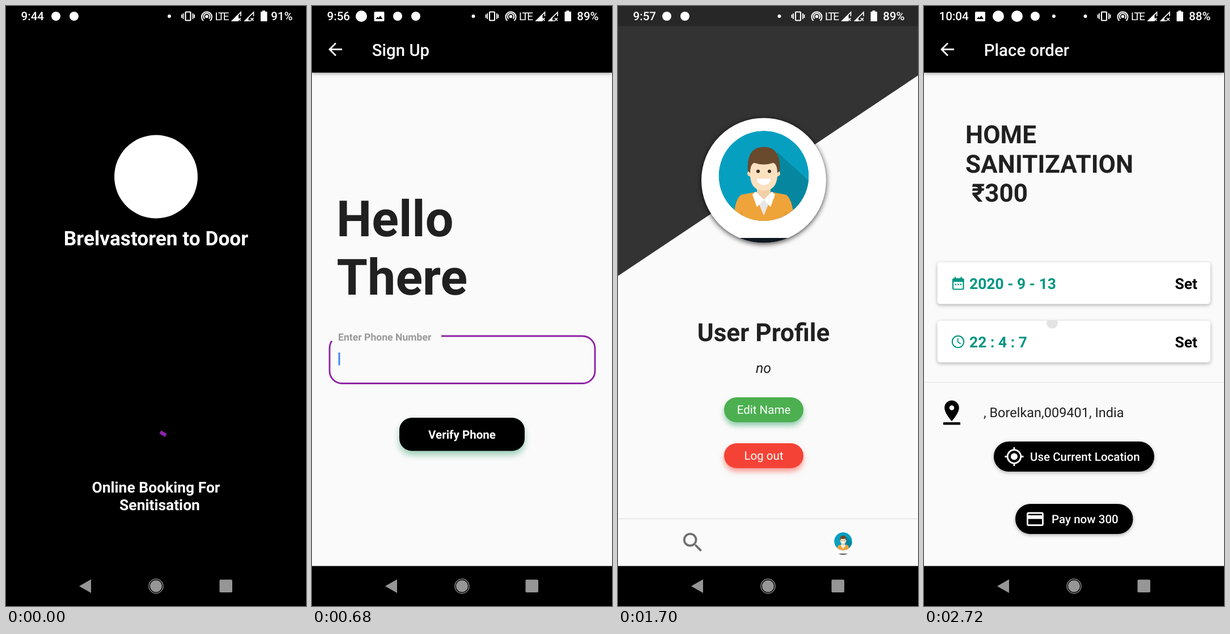
Write an HTML page that moves like this. It is 529 px wide and 1058 px high and loops after 3.06 s.

```html
<!DOCTYPE html>
<html lang="en">
<head>
<meta charset="utf-8">
<title>Booking app walkthrough</title>
<style>
  html, body { margin: 0; width: 100%; height: 100%; overflow: hidden; background: #000; }
  svg { display: block; width: 529px; height: 1058px; font-family: Roboto, sans-serif; }
  text { white-space: pre; text-rendering: geometricPrecision; font-kerning: normal; }
  .lift { filter: drop-shadow(0 2px 3px rgba(0,0,0,.3)); }
</style>
</head>
<body>
<svg id="stage" viewBox="0 0 529 1058">
  <defs>
    <clipPath id="photoClip"><rect width="264.5" height="264.5" rx="29"/></clipPath>
    <clipPath id="faceClip"><circle cy="-8" r="79.5"/></clipPath>
    <clipPath id="avatarClip"><circle r="110"/></clipPath>
    <clipPath id="bodyClip"><rect y="35" width="529" height="870"/></clipPath>
    <clipPath id="cardClip"><rect x="23" y="554.5" width="482" height="74"/></clipPath>
    <linearGradient id="daySky" x2="0" y2="1">
      <stop stop-color="#219fe8"/><stop offset=".6" stop-color="#72c3f1"/><stop offset="1" stop-color="#bfe4f4"/>
    </linearGradient>
    <linearGradient id="water" x2="0" y2="1">
      <stop stop-color="#72b0b4"/><stop offset=".4" stop-color="#469b98"/><stop offset="1" stop-color="#358a82"/>
    </linearGradient>
    <linearGradient id="duskSky" x2="0" y2="1">
      <stop stop-color="#3d8cc4"/><stop offset=".45" stop-color="#86a8c2"/>
      <stop offset=".75" stop-color="#8d8296"/><stop offset="1" stop-color="#dd7d58"/>
    </linearGradient>
    <linearGradient id="city" x2="0" y2="1">
      <stop stop-color="#5c4543"/><stop offset=".4" stop-color="#352b2b"/><stop offset="1" stop-color="#2a241f"/>
    </linearGradient>
    <linearGradient id="heart" x2="0" y2="1">
      <stop stop-color="#e2535a"/><stop offset="1" stop-color="#cf3237"/>
    </linearGradient>
  </defs>
</svg>
<script>
const STEP = 340;
const INK = '#202020', PAPER = '#fafafa', PURPLE = '#8e24a6', TEAL = '#009682', GREY = '#9a9a9a';

const text = (x, y, size, weight, fill, str, extra = '') =>
  `<text x="${x}" y="${y}" font-size="${size}" font-weight="${weight}" fill="${fill}" ${extra}>${str}</text>`;
const rect = (x, y, w, h, fill, rx = 0, extra = '') =>
  `<rect x="${x}" y="${y}" width="${w}" height="${h}" rx="${rx}" fill="${fill}" ${extra}/>`;
const circle = (x, y, r, fill, extra = '') =>
  `<circle cx="${x}" cy="${y}" r="${r}" fill="${fill}" ${extra}/>`;
const path = (d, fill, extra = '') => `<path d="${d}" fill="${fill}" ${extra}/>`;
const line = (d, color, width, extra = '') =>
  path(d, 'none', `stroke="${color}" stroke-width="${width}" ${extra}`);
const group = (x, y, body, scale = 1, extra = '') =>
  `<g transform="translate(${x} ${y}) scale(${scale})" ${extra}>${body}</g>`;
// Tracked text carries half of its spacing before the first letter.
const tracked = (x, y, size, weight, fill, str, gap, extra = '') =>
  text(x + gap / 2, y, size, weight, fill, str, `letter-spacing="${gap}" ${extra}`);
const MIDDLE = 'text-anchor="middle"', END = 'text-anchor="end"';

// Status bar: icons is a list of [kind, x].
const pictureIcon = x =>
  path(`M${x - 7} 10h14q2 0 2 2v13q0 2-2 2h-14q-2 0-2-2v-13q0-2 2-2zM${x - 6} 23h12l-4-6-3 4-2-2z`,
    '#fff', 'fill-rule="evenodd"');
const signal = (x, fill) =>
  path(`M${x} 27L${x + fill} ${27 - fill}V27z`, '#fff') +
  line(`M${x + 12} 26H${x + 2}L${x + 17} 11V18M${x + 12} 21l5 5m0-5l-5 5`, '#fff', 1.7);

function statusBar(clock, percent, icons, bg, shift = 0) {
  const left = icons.map(([kind, x]) =>
    kind === 'picture' ? pictureIcon(x) : circle(x, 18, { dot: 3, badge: 8, round: 10 }[kind], '#fff')).join('');
  const right = circle(284.5, 18, 3, '#fff') +
    rect(313, 10.5, 9, 15, 'none', 1, 'stroke="#fff" stroke-width="2.2"') +
    line('M309 13v10M326 13v10M306.5 15v6M328.5 15v6', '#fff', 1.8) +
    circle(350.5, 18.5, 2.8, '#fff') +
    line('M346.5 22.5a5.6 5.6 0 1 1 8 0M344.5 26a9 9 0 1 1 12 0', '#fff', 2) +
    text(365, 25, 19, 400, '#fff', 'LTE', 'letter-spacing="-2.4"') +
    signal(393.5, 13) + signal(416, 8) +
    path('M448.5 8h5v2h3.5v17h-11.5v-17h3z', '#fff');
  return rect(0, 0, 529, 35.3, bg) + text(26.5, 25, 20.6, 500, '#fff', clock) + left +
    group(shift, 0, right) + text(505.5, 25, 20.4, 500, '#fff', percent, END);
}

const systemNav = rect(0, 987.5, 529, 70.5, '#000') +
  path('M129 1023L150 1011V1035z', '#969696') +
  circle(264.5, 1023, 10.5, '#969696') +
  circle(264.5, 1023, 12.6, 'none', 'stroke="#969696" stroke-width="1.3"') +
  rect(376.5, 1011.5, 22.5, 22.5, '#969696', 2);

const appBar = title => rect(0, 20, 529, 97.5, '#000', 0, 'class="lift"') +
  line('M53 76.5H32M42 65.5L31 76.5L42 87.5', '#fff', 2.8) +
  text(105.8, 87.5, 29.4, 500, '#fff', title);

const page = rect(0, 0, 529, 1058, PAPER);

// Portrait centred on the origin.
const avatar = circle(0, 0, 110, '#fff') +
  `<g clip-path="url(#avatarClip)">${rect(-110, 101.5, 220, 10, '#101820')}</g>` +
  `<g clip-path="url(#faceClip)">` + circle(0, -8, 79.5, '#079fc0') +
  path('M24 -50L95 15V80H30L0 15z', '#06879f') +
  path('M-54 75Q-51 28-38 25L-16 21H16L38 25Q50 28 55 75z', '#efa43a') +
  line('M-37 75l-2-20M37 75l2-20', '#d58d28', 1.5) +
  path('M-17 21L0 62L17 21z', '#e6e6e6') +
  path('M-12 5H12V22L0 34L-12 22z', '#f2cfa6') +
  path('M-14 20L0 34L-12 47L-20 25zM14 20L0 34L12 47L20 25z', '#fff') +
  circle(-24, -12, 5, '#f7d6ae') + circle(24, -12, 5, '#f7d6ae') +
  path('M-24 -38H24V-7Q22 18 0 18T-24-7z', '#fbe1c0') +
  path('M-28 -17Q-31 -59 0 -59T28 -17L24 -13Q24 -28 17 -31Q0 -25-17-31Q-24-28-24-13z', '#694a2c') +
  circle(-10, -16, 3, '#3b2a20') + circle(10, -16, 3, '#3b2a20') +
  path('M-12 -3H12Q11 8 0 8T-12 -3z', '#fff') + '</g>';

const magnifier = 'M15.5 14h-.79l-.28-.27A6.47 6.47 0 0 0 16 9.5 6.5 6.5 0 1 0 9.5 16c1.61 0 3.09-.59 4.23-1.57l.27.28v.79l5 4.99L20.49 19zM9.5 14a4.5 4.5 0 1 1 0-9 4.5 4.5 0 0 1 0 9z';
const tabBar = searchColor =>
  rect(0, 905, 529, 82.5, PAPER, 0, 'style="filter:drop-shadow(0 -1px 1px rgba(0,0,0,.12))"') +
  group(109.3, 923.3, path(magnifier, searchColor), 1.887) +
  group(397, 945.5, avatar, 0.2, 'style="filter:drop-shadow(0 0 1px rgba(0,0,0,.12))"');

// Both views fill a 264.5 px square.
const canalView = rect(0, 0, 265, 150, 'url(#daySky)') + rect(0, 142, 265, 123, 'url(#water)') +
  path('M88 146L130 141V131L140 126H182V136L205 128V156L130 148z', '#96766a') +
  path('M205 124L218 117H236L250 112H265V162L205 156z', '#a8644e') +
  path('M205 124L236 117L265 112V120L212 127z', '#cb7f5d') +
  line('M212 138H262M212 149H262', '#6d4239', 5, 'stroke-dasharray="3 5"') +
  path('M140 131Q141 111 152 109V104V109Q164 111 165 131zM167 131Q167 120 173 119T180 131z', '#8295a8') +
  path('M0 77L12 78V92L42 90L62 101V111L88 112V152L58 163L30 181L0 190z', '#bda389') +
  path('M0 77L12 78V190H0zM62 111L88 112V152L62 160z', '#a2634c') +
  line('M17 104H60M17 122H60M17 141H60M17 160H54', '#58463f', 8, 'stroke-dasharray="4 5"') +
  line('M65 122H86M65 135H86', '#5d3d35', 5, 'stroke-dasharray="3 4"') +
  path('M0 183L56 162L100 155L82 166L30 190L0 212z', '#3f5a55') +
  path('M128 265L193 218L206 224L177 265zM146 201L178 198L166 207z', '#8fc6c0') +
  path('M138 181L149 175L166 182V194L152 201L139 195z', '#e9e2d6') + path('M139 190H166L161 199H145z', '#6b4438') +
  path('M183 207L198 197L206 204L204 211L188 219z', '#f1eee6') +
  path('M139 241L164 221L181 217L182 228L165 247L145 256z', '#a9553f') + path('M149 234L166 223L179 225L158 241z', '#e2c8b0') +
  circle(145, 167, 3, '#eee') + circle(133, 174, 3, '#eee');

const cityView = rect(0, 0, 265, 122, 'url(#duskSky)') +
  path('M0 20Q40 5 90 28T265 20V34Q120 60 70 48T0 40z', '#c9d6df', 'opacity=".6"') +
  path('M30 55Q65 40 92 54T154 62Q90 72 30 55zM90 18l40-5 24 8-40 8zM0 76Q50 66 154 84V92Q60 82 0 88z', '#38597b', 'opacity=".6"') +
  rect(0, 118, 265, 147, 'url(#city)') +
  line('M0 127H160M6 138H160M0 150H160M3 164H90', '#a8713f', 2, 'stroke-dasharray="2 9 4 6"') +
  path('M154 152Q90 164 72 184Q80 215 30 265H112Q126 220 154 210z', '#566f90') +
  path('M0 180L70 185L80 215L30 265H0z', '#2a2726') +
  path('M20 180Q80 181 154 206V216Q80 195 20 190z', '#e3a92c') +
  line('M50 192q4 8 12 3M90 201q8 9 16 4M124 210q8 8 20 6', '#8f6a2d', 4) +
  path('M76 265Q98 235 154 225V265z', '#4d3a1d') +
  line('M80 259Q104 240 154 230M96 264L150 246M4 205L50 218M2 236L40 245', '#e0a030', 4, 'stroke-dasharray="4 7"');

const locationArrow = path('M0 8L14 0Q16 0 15 2L9 15H7V8z', '#fff');

function place(x, name, size, kind, view) {
  return rect(x - 15, 456, 294, 176, '#fff', 15) +
    rect(x, 242.5, 264.5, 264.5, '#789', 29, 'style="filter:drop-shadow(0 2px 4px rgba(0,0,0,.4))"') +
    group(x, 242.5, view, 1, 'clip-path="url(#photoClip)"') +
    tracked(x + 14.2, 460, 35.3, 500, '#fff', name, 1.76) +
    group(x + 14.5, 473.5, locationArrow) + text(x + 36.5, 488, 20.6, 400, '#fff', size) +
    tracked(x - 0.3, 584.5, 32.3, 500, INK, 'activities', 1.76) +
    text(x - 0.5, 612.5, 20.57, 400, GREY, kind);
}

const offer = (y, radius, title, note) => rect(59, y, 440.5, 176, '#000', radius) +
  text(76.5, y + 51.5, 36.7, 700, '#fff', title) +
  text(76.5, y + 94.5, 36.7, 700, '#fff', 'Sanitization-Tap Here') +
  text(76.5, y + 140, 23.5, 400, '#fff', note);

function home(scroll, heading, status) {
  const content = text(29.4, 120, 44.08, 700, INK, 'Categories') +
    path('M283.5 128C278 121 258.5 112 258.5 96C258.5 80 278 79 283.5 92C289 79 308.5 80 308.5 96C308.5 112 289 121 283.5 128z', 'url(#heart)') +
    tracked(29.4, 219, 32.33, 700, INK, heading, 2.2) +
    place(37, 'Home', 'S', 'Senitize home', canalView) +
    place(375, 'Villa', 'M', 'Senitize Villa', cityView) +
    offer(683.5, 22, '3 Tap Surroundings', 'Enter Your approx Area measure Here') +
    offer(889, 29, '3 Tap Live Place', 'Enter Your approx  Area measure Here');
  return page + `<g clip-path="url(#bodyClip)">${group(0, -scroll, content)}</g>` +
    tabBar(PURPLE) + status;
}

const splash = rect(0, 0, 529, 1058, '#000') +
  statusBar('9:44', '91%', [['badge', 88], ['badge', 120]], '#000', 3.5) +
  circle(264.5, 301, 73.5, '#fff') +
  text(264.5, 422, 35.26, 700, '#fff', 'Brelvastoren to Door', MIDDLE) +
  line('M272 751.3L282 757', '#8e24aa', 6.5) +
  text(264.5, 858, 26.45, 700, '#fff', 'Online Booking For', MIDDLE) +
  text(271, 889, 26.45, 700, '#fff', 'Senitisation', MIDDLE);

const signUp = page + appBar('Sign Up') +
  statusBar('9:56', '89%', [['round', 87], ['picture', 118.5], ['badge', 151], ['badge', 183]], '#000') +
  text(43, 406, 88.16, 700, INK, 'Hello') + text(43.5, 509, 88.16, 700, INK, 'There') +
  line('M228 582H477a22 22 0 0 1 22 22V643.5a22 22 0 0 1-22 22H53a22 22 0 0 1-22-22V604q0-8 4-13.5', PURPLE, 2.9) +
  text(46, 590, 17.63, 700, GREY, 'Enter Phone Number') +
  rect(46.5, 611, 3, 22.5, '#4285f4') +
  rect(154, 726, 221, 58.5, '#000', 22, 'style="filter:drop-shadow(0 7px 6px rgba(40,150,100,.45))"') +
  text(264.5, 762.5, 20.57, 700, '#fff', 'Verify Phone', MIDDLE);

const pill = (y, color, glow, label) =>
  rect(187, y, 140, 44, color, 22, `style="filter:drop-shadow(0 6px 5px ${glow})"`) +
  text(257, y + 29, 20.57, 400, '#fff', label, MIDDLE);

const profile = page + path('M0 0H529V122.5L0 476z', '#333') +
  statusBar('9:57', '89%', [['badge', 86], ['badge', 118]], '#272727') +
  group(257, 307.5, avatar, 1, 'style="filter:drop-shadow(0 2px 5px rgba(0,0,0,.75))"') +
  text(256.5, 591, 44.08, 700, INK, 'User Profile', MIDDLE) +
  text(256.5, 647, 25, 400, INK, 'no', MIDDLE + ' font-style="italic"') +
  pill(690, '#4caf50', 'rgba(40,160,100,.5)', 'Edit Name') +
  pill(771, '#f44336', 'rgba(244,67,54,.5)', 'Log out') + tabBar('#707070');

const field = (y, value) => rect(23.5, y, 481.5, 73.5, '#fff', 5, 'class="lift"') +
  text(80, y + 46.5, 26.45, 700, TEAL, value) + text(482, y + 46.5, 26.45, 700, '#000', 'Set', END);

const mapPin = 'M18 8c0-3.31-2.69-6-6-6S6 4.69 6 8c0 4.5 6 11 6 11s6-6.5 6-11zM10 8a2 2 0 1 1 4 0a2 2 0 0 1-4 0zM5 20v2h14v-2z';
const order = touched => page + appBar('Place order') +
  statusBar('10:04', '88%', [['picture', 99], ['round', 131], ['round', 164], ['badge', 196], ['dot', 229]], '#000') +
  ['HOME', 'SANITIZATION', ' ₹300'].map((row, i) => text(73, 242 + 51.6 * i, 44.08, 700, INK, row)).join('') +
  field(452, '2020 - 9 - 13') +
  rect(51, 481, 18.5, 18.5, 'none', 2, `stroke="${TEAL}" stroke-width="2.2"`) +
  line('M50 484H70.5', TEAL, 5) + line('M55 477.5v4M65.5 477.5v4', TEAL, 2.2) +
  line('M54.5 491H67', TEAL, 2.6, 'stroke-dasharray="2.6 2"') +
  field(555, '22 : 4 : 7') +
  (touched ? `<g clip-path="url(#cardClip)">${circle(226, 559, 10, '#e3e3e3')}</g>` : '') +
  circle(60, 592, 10.2, 'none', `stroke="${TEAL}" stroke-width="2"`) + line('M59.7 586v6.5l5 3', TEAL, 1.8) +
  rect(0, 663, 529, 1.2, '#e6e6e6') +
  group(23.3, 691.3, path(mapPin, '#000', 'fill-rule="evenodd"'), 2.14) +
  text(105, 725, 23.5, 400, INK, ', Borelkan,009401, India') +
  rect(123, 768, 283, 53, '#000', 26.5, 'class="lift"') +
  circle(159, 794.5, 11.8, 'none', 'stroke="#fff" stroke-width="2.8"') + circle(159, 794.5, 6, '#fff') +
  line('M159 778v5M159 806v5M142.5 794.5h5M170.5 794.5h5', '#fff', 2.8) +
  text(187, 802, 20.57, 500, '#fff', 'Use Current Location') +
  rect(161, 878, 207.5, 53, '#000', 26.5, 'class="lift"') +
  rect(182.5, 894, 27, 21.5, 'none', 2, 'stroke="#fff" stroke-width="2.8"') + rect(182, 898, 28, 6.5, '#fff') +
  text(225, 912, 20.57, 500, '#fff', 'Pay now 300');

const homeStatus = (clock, percent, icons) => statusBar(clock, percent, icons, '#b5b5b5');
const homeTop = home(0, 'Senitize everything', homeStatus('9:57', '89%', [['badge', 86], ['badge', 118]]));
const homeScrolled = home(118, 'Sanitize everything', homeStatus('10:03', '88%',
  [['round', 97], ['round', 130], ['picture', 162], ['badge', 194], ['dot', 227]]));

const scenes = [splash, signUp, signUp, homeTop, homeScrolled, profile, order(false), order(false), order(true)];
const stage = document.getElementById('stage');
stage.insertAdjacentHTML('beforeend', scenes.map(s => `<g class="scene" display="none">${s}</g>`).join('') + systemNav);
const layers = stage.querySelectorAll('.scene');

const start = performance.now();
function draw() {
  const current = Math.floor((performance.now() - start) / STEP) % scenes.length;
  layers.forEach((layer, i) => layer.setAttribute('display', i === current ? 'inline' : 'none'));
  requestAnimationFrame(draw);
}
draw();
</script>
</body>
</html>
```
